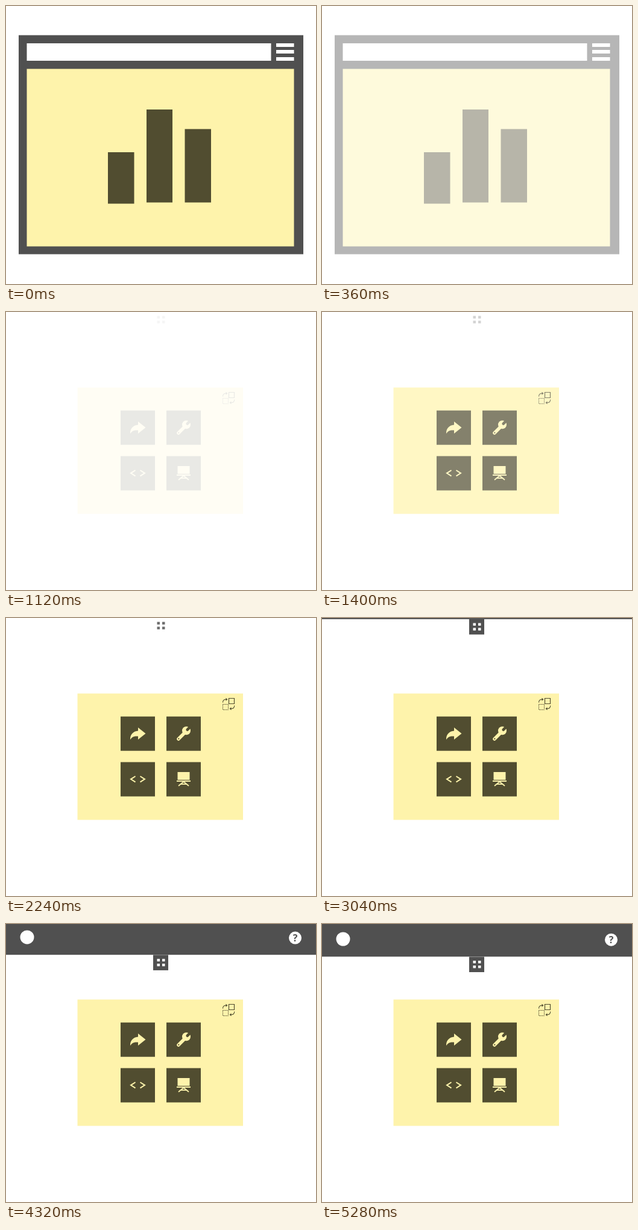
An HTML page with a canvas that plays this animation: 514x462 px, repeating every 5480 ms.

```html
<!DOCTYPE html>
<html lang="en">
<head>
<meta charset="utf-8">
<title>Panel and toolbar</title>
<style>
html, body { margin: 0; width: 100%; height: 100%; overflow: hidden; background: #fff; }
canvas { display: block; }
</style>
</head>
<body>
<canvas id="stage" width="514" height="462"></canvas>
<script>
const W = 514, H = 462, LOOP = 5480;
const GREY = '#505050', YELLOW = '#fef3ab', DARK = '#514d30', WHITE = '#fff';
const canvas = document.getElementById('stage');
const ctx = canvas.getContext('2d');

const progress = (t, from, to) => Math.min(1, Math.max(0, (t - from) / (to - from)));

function box(color, x, y, w, h) {
  ctx.fillStyle = color;
  ctx.fillRect(x, y, w, h);
}

function disc(color, x, y, r) {
  ctx.fillStyle = color;
  ctx.beginPath();
  ctx.arc(x, y, r, 0, Math.PI * 2);
  ctx.fill();
}

function fill(color, d) {
  ctx.fillStyle = color;
  ctx.fill(new Path2D(d));
}

function stroke(color, width, d, cap = 'butt') {
  ctx.strokeStyle = color;
  ctx.lineWidth = width;
  ctx.lineCap = cap;
  ctx.stroke(new Path2D(d));
}

// White veil over a region: fades whatever was drawn there.
function veil(amount, x, y, w, h) {
  ctx.globalAlpha = amount;
  box(WHITE, x, y, w, h);
  ctx.globalAlpha = 1;
}

function drawWindow(alpha) {
  if (alpha <= 0) return;
  box(GREY, 21, 48.5, 472, 364);
  box(WHITE, 34.5, 62, 405, 29);
  for (const y of [62, 73, 85]) box(WHITE, 448, y, 29.5, 6);
  box(YELLOW, 34.5, 104.5, 443, 295);
  box(DARK, 169, 243, 43.5, 85.5);
  box(DARK, 233, 172, 43, 154.5);
  box(DARK, 296.5, 204.5, 43.5, 122);
  veil(1 - alpha, 20, 47, 474, 367);
}

function drawSwap() {
  stroke(DARK, 1.2, 'M369.5 133.5h9v9h-9z');
  ctx.setLineDash([1.5, 1]);
  stroke(DARK, 1, 'M359.5 143.5h9v9h-9z');
  ctx.setLineDash([]);
  stroke(DARK, 1.1, 'M359.5 140.5C359.5 137 361.5 135.3 365 135.3M378.7 145.5C378.7 149 376.5 150.8 373 150.8');
  fill(DARK, 'M364.5 132.8L367.5 135.3L364.5 137.8ZM373.5 148.3L370.5 150.8L373.5 153.3Z');
}

function drawWrench() {
  stroke(YELLOW, 5.5, 'M286 201L297 190', 'round');
  disc(YELLOW, 299, 187.3, 7);
  stroke(DARK, 4.6, 'M300.7 185.7L308 178.4', 'round');
  disc(DARK, 286.3, 200.7, 1.1);
}

function drawPanel(alpha) {
  if (alpha <= 0) return;
  box(YELLOW, 118.5, 125.5, 274.5, 210);
  for (const x of [190, 266])
    for (const y of [163.7, 239.5]) box(DARK, x, y, 57, 57);
  fill(YELLOW, 'M219 182L231.5 192L219 202V196.6C213 196 208.5 197.5 206 202.3C205.5 194 211 188 219 187.6Z');
  drawWrench();
  stroke(YELLOW, 2, 'M214.5 263L207 267.8L214.5 272.6M222.5 263L230 267.8L222.5 272.6');
  box(YELLOW, 284.5, 256, 20, 13);
  box(YELLOW, 283, 270, 23, 2);
  stroke(YELLOW, 1.8, 'M294.5 272L286 279M294.5 272L303 279M289.5 276.2h10');
  drawSwap();
  veil(1 - alpha, 117, 124, 278, 213);
}

function drawTab(t, y) {
  const shown = progress(t, 2480, 2960);
  if (shown > 0) {
    ctx.globalAlpha = shown;
    box(GREY, 244, y, 25, 25.5);
    ctx.globalAlpha = 1;
  }
  // The dots darken on white, then turn white as the tab fills in.
  const shade = Math.round(255 - 175 * (progress(t, 1040, 2480) - shown));
  const color = `rgb(${shade},${shade},${shade})`;
  for (const dx of [250.5, 259])
    for (const dy of [6.5, 14.5]) box(color, dx, y + dy, 4.5, 4.3);
}

function drawHelp(y, scale) {
  ctx.save();
  ctx.translate(479.5, y);
  ctx.scale(scale, scale);
  disc(WHITE, 0, 0, 10.5);
  ctx.fillStyle = GREY;
  ctx.font = '700 16px "Open Sans", "Noto Sans", sans-serif';
  ctx.textAlign = 'center';
  ctx.fillText('?', 0, 6);
  ctx.restore();
}

function drawHeader(t) {
  const h = 54.5 * progress(t, 2990, 4400);
  if (h > 0) {
    const pulse = Math.sin(Math.PI * progress(t, 4760, 5280));
    ctx.save();
    ctx.beginPath();
    ctx.rect(0, 0, W, h);
    ctx.clip();
    box(GREY, 0, 0, W, h);
    disc(WHITE, 35, h - 29.5, 11.5);
    drawHelp(h - 28.3, 1 + pulse);
    ctx.restore();
  }
  drawTab(t, h);
}

function draw(t) {
  box(WHITE, 0, 0, W, H);
  drawWindow(1 - progress(t, 80, 560));
  drawPanel(progress(t, 1060, 1540));
  drawHeader(t);
}

const start = performance.now();
function tick() {
  const t = (performance.now() - start) % LOOP;
  draw(Math.floor(t / 40) * 40);
  requestAnimationFrame(tick);
}
tick();
</script>
</body>
</html>
```
